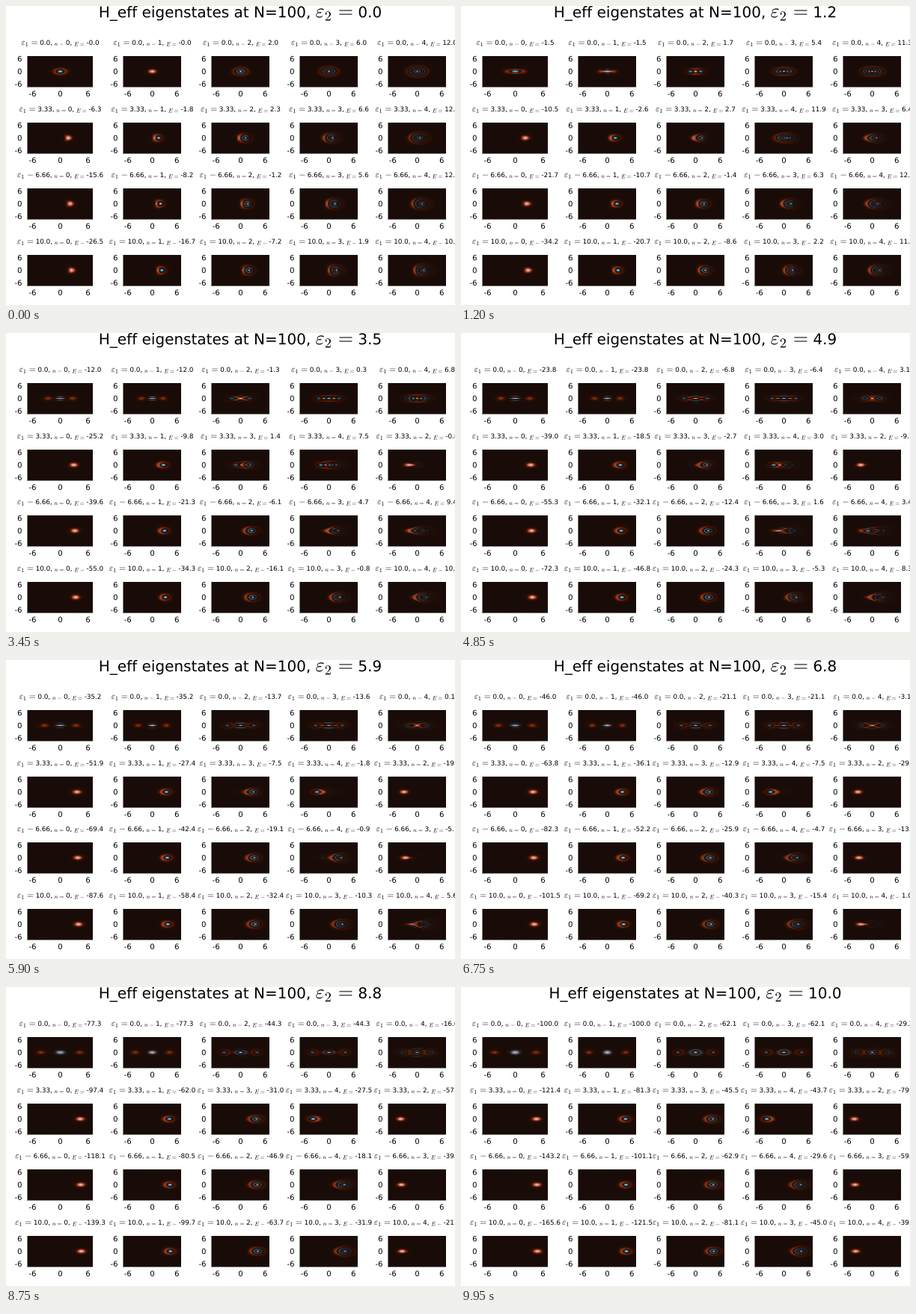
Write a matplotlib script that moves like this. It is 600 by 400 pixels and loops after 10000 ms.

```python
import numpy as np
import matplotlib as mpl
import matplotlib.pyplot as plt
from matplotlib.animation import FuncAnimation
from matplotlib.colors import LinearSegmentedColormap
from matplotlib.patches import PathPatch
from matplotlib.path import Path
from matplotlib.textpath import TextPath

mpl.rcParams["font.family"] = "DejaVu Sans"
mpl.rcParams["mathtext.fontset"] = "cm"

W, H = 600, 400
FRAMES = 200
EPS1 = np.linspace(0, 10, 4)
DRIVES = np.linspace(0, 10, FRAMES)

# Panel layout in pixels
LEFTS = [29, 157, 275, 393, 511]
WIDTHS = [87, 77, 77, 77, 77]
TOPS = [round(67 + 88.67 * r) for r in range(4)]
PANEL_H = 41

# Diverging colours: blue for negative, red for positive
BLUES = ["#9EB0FF", "#5AA3DA", "#2D7597", "#194155", "#11181D"]
REDS = ["#270C01", "#501803", "#8A3F2A", "#C37469", "#FFACAC"]
stops = [(i / 9, c) for i, c in enumerate(BLUES)]
stops += [(0.5, "#190C09")]
stops += [((i + 5) / 9, c) for i, c in enumerate(REDS)]
CMAP = LinearSegmentedColormap.from_list("wigner", stops, N=512)

# ---- Kerr oscillator in the Fock basis ----
DIM = 60
num = np.arange(DIM)
a = np.diag(np.sqrt(num[1:]), 1)
one_photon = a + a.T
two_photon = a @ a + (a @ a).T
kerr = np.diag(num * (num - 1.0))
# Tiny shift that puts the odd state of a degenerate pair first
pair_bias = 1e-7 * np.diag((-1.0) ** num) - 2e-7 * np.eye(DIM)


def eigenstates(e2):
    """Five lowest levels per row, ordered by falling mean position."""
    base = kerr - e2 * two_photon + pair_bias
    energy, vec = np.linalg.eigh(np.array([base - e1 * one_photon for e1 in EPS1]))
    energy, vec = energy[:, :5], vec[:, :, :5]
    mean_x = np.einsum("rik,ij,rjk->rk", vec, one_photon, vec, optimize=True)
    order = np.argsort(-np.round(mean_x, 3), axis=1, kind="stable")
    energy = np.take_along_axis(energy, order, 1)
    vec = np.take_along_axis(vec, order[:, None, :], 2)
    return order, energy, vec.transpose(0, 2, 1)


# ---- Wigner function on a grid of -7..7 ----
STEP, CELLS = 0.1, 141
grid = (np.arange(281) - 140) * STEP
basis = np.zeros((DIM, grid.size))
basis[0] = np.pi ** -0.25 * np.exp(-grid ** 2 / 2)
basis[1] = np.sqrt(2) * grid * basis[0]
for k in range(1, DIM - 1):
    basis[k + 1] = (np.sqrt(2 / (k + 1)) * grid * basis[k]
                    - np.sqrt(k / (k + 1)) * basis[k - 1])


def cell_of(pixels):
    return ((np.arange(pixels) + 0.5) / pixels * CELLS).astype(int)


shift = np.arange(71)
momenta = (cell_of(PANEL_H) - 70) * STEP
kernel = 2 * STEP * np.cos(2 * np.outer(shift * STEP, momenta))
kernel[0] /= 2
centres = {w: cell_of(w)[:, None] + 70 for w in set(WIDTHS)}


def wigner(psi, width):
    """Wigner function scaled to -1..1, indexed [..., row, column]."""
    c = centres[width]
    product = psi[..., c + shift] * psi[..., c - shift]
    return np.swapaxes(product @ kernel, -1, -2)


# ---- Text as outlines ----
outlines = {}


def right_edge(text):
    return TextPath((0, 0), text, size=1).vertices[:, 0].max()


def outline(text):
    """Vertices, codes and advance of one character or math piece."""
    if text not in outlines:
        path = TextPath((0, 0), text, size=1)
        if text[0] == "$":
            advance = right_edge(text) + 0.056
        else:
            advance = right_edge(text + "|") - right_edge("|")
        outlines[text] = (path.vertices.copy(), path.codes, advance)
    return outlines[text]


class Ink:
    """Collects outlines for a single filled path."""

    def __init__(self):
        self.verts, self.codes = [], []

    def write(self, parts, x, base, size, align=0.5):
        """Parts are plain strings or (math, scale, drop) triples."""
        pieces = []
        for part in parts:
            if isinstance(part, tuple):
                math, scale, drop = part
                pieces.append((outline(math), size * scale, drop))
            else:
                pieces += [(outline(ch), size, 0) for ch in part]
        x -= align * sum(g[2] * s for g, s, _ in pieces)
        for (verts, codes, advance), s, drop in pieces:
            if len(verts):
                self.verts.append(verts * (s, -s) + (x, base + drop))
                self.codes.append(codes)
            x += advance * s

    def path(self):
        return Path(np.concatenate(self.verts), np.concatenate(self.codes))


# ---- Static parts ----
fig = plt.figure(figsize=(W / 100, H / 100), dpi=100, facecolor="white")
ax = fig.add_axes([0, 0, 1, 1])
ax.set_axis_off()

canvas = np.full((H, W, 3), 255, np.uint8)
ticks = Ink()
for top in TOPS:
    mid = top + PANEL_H / 2
    for left, width in zip(LEFTS, WIDTHS):
        # axis lines, half covered by the panel
        canvas[top:top + PANEL_H, left - 1] = 128
        canvas[top + PANEL_H, left - 1:left + width] = 128
        for value in (-6, 0, 6):
            x = left + width / 2 + value * width / 14.1
            ticks.write([str(value)], x, top + 53.9, 10)
            ticks.write([str(value)], left - 7.5, mid - 2.8 * value + 3.6, 10, align=1)

image = ax.imshow(canvas, extent=(0, W, H, 0), interpolation="nearest", aspect="auto")
ax.set_xlim(0, W)
ax.set_ylim(H, 0)


def add_ink(path):
    patch = PathPatch(path, facecolor="black", linewidth=0, snap=False)
    return ax.add_patch(patch)


add_ink(ticks.path())
titles = add_ink(ticks.path())

# Relation signs as they come out on each row: eps, n, E
SIGNS = ["=-=", "===", "-==", "==-"]


def relation(symbol, sign, scale, drop):
    return rf"${symbol}\hspace{{0.12}}{sign}$", scale, drop


def panel_title(row, n, energy):
    eps_sign, n_sign, e_sign = SIGNS[row]
    eps = np.floor(EPS1[row] * 100) / 100
    return [relation(r"\varepsilon_1", eps_sign, 1.3, 0), f" {eps}, ",
            relation("n", n_sign, 0.87, 1), f" {n}, ",
            relation("E", e_sign, 0.87, 1.5), f" {energy:.1f}"]


def update(i):
    e2 = DRIVES[i]
    order, energy, vec = eigenstates(e2)
    psi = vec @ basis

    ink = Ink()
    ink.write(["H_eff eigenstates at N=100, ",
               relation(r"\varepsilon_2", "=", 1.3, 0), f" {e2:.1f}"], 313, 15.2, 20)
    for col, (left, width) in enumerate(zip(LEFTS, WIDTHS)):
        colours = CMAP((wigner(psi[:, col], width) + 1) / 2, bytes=True)
        for row, top in enumerate(TOPS):
            canvas[top:top + PANEL_H, left:left + width] = colours[row, ..., :3]
            ink.write(panel_title(row, order[row, col], energy[row, col]),
                      left + width / 2, top - 15, 8.75)
    image.set_data(canvas)
    titles.set_path(ink.path())
    return image, titles


anim = FuncAnimation(fig, update, frames=FRAMES, interval=50, repeat=True,
                     repeat_delay=0, blit=False)
plt.show()
```
